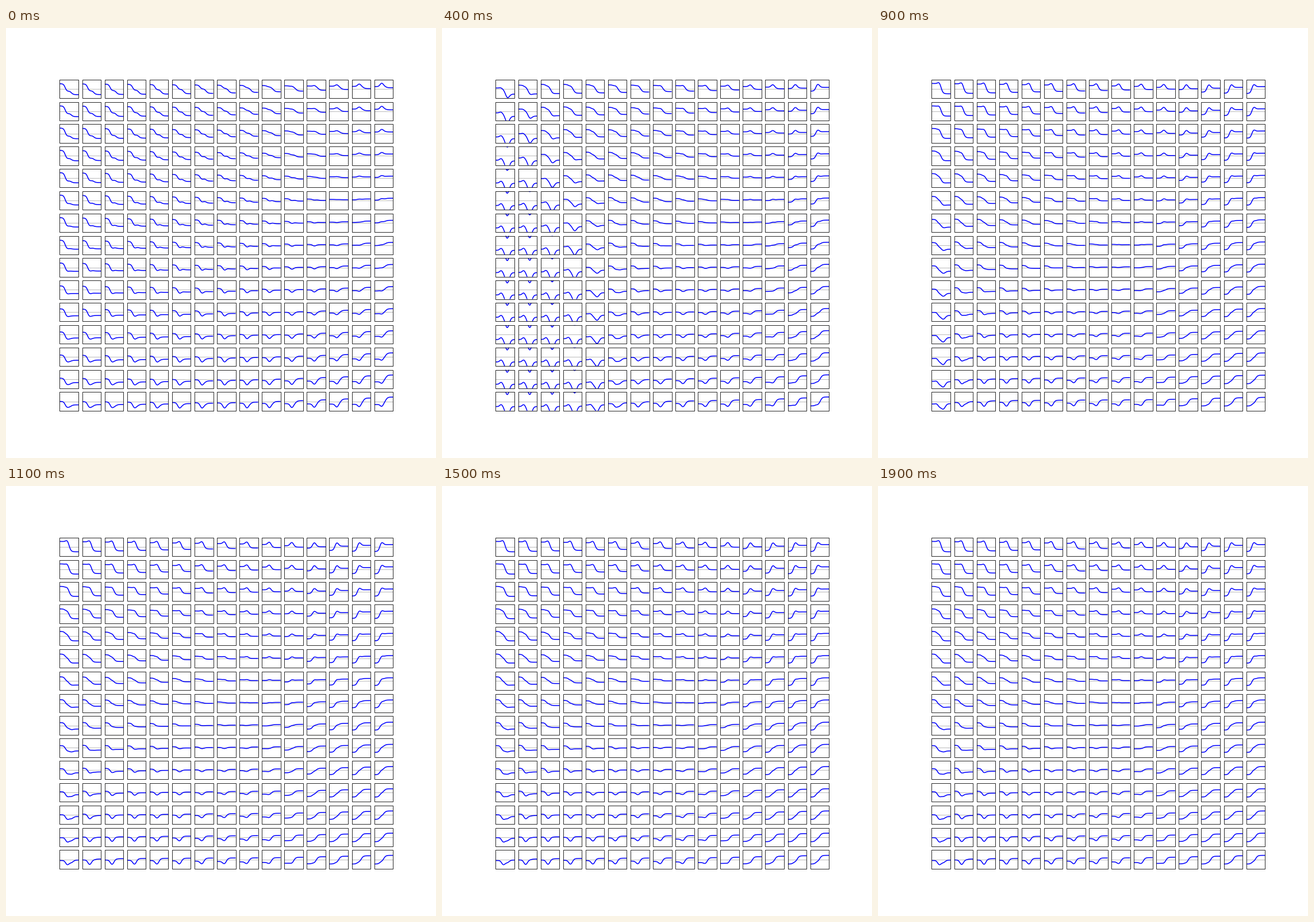
Write a matplotlib script that moves like this. It is 748 px wide and 748 px high and loops after 2000 ms.

```python
import numpy as np
import matplotlib.pyplot as plt
from matplotlib.animation import FuncAnimation
from matplotlib.collections import LineCollection
from matplotlib.patches import PathPatch
from matplotlib.path import Path

SIZE, N, FRAMES = 748, 15, 20
SPAN = N + 0.2 * (N - 1)
W, H = 0.775 * SIZE / SPAN, 0.77 * SIZE / SPAN
LEFT = 0.125 * SIZE + 1.2 * W * np.arange(N)
BASE = 0.88 * SIZE - H - 1.2 * H * np.arange(N)

x = np.linspace(0, W, 60)
col = np.arange(N)[None, :, None]
u = col / (N - 1)
v = np.arange(N)[:, None, None] / (N - 1)


def sigmoid(z):
    return 1 / (1 + np.exp(-z))


def bump(center, width):
    return np.exp(-((x - center) / width) ** 2 / 2)


def corners(tl, tr, bl, br):
    return (1 - v) * ((1 - u) * tl + u * tr) + v * ((1 - u) * bl + u * br)


def left_arch(power):
    return np.sin(np.pi * v) * (1 - u) ** power


top_arch = np.sin(np.pi * u)

# Each grid: starting level, first step, middle bump, second step.
FIRST = (corners(9, 4, 0, -5.5) + 4 * left_arch(1),
         corners(-12, 1, -10, 3) - 3 * left_arch(3),
         corners(-1, 5, -1, -6) - 2 * top_arch,
         corners(-7, -3, 4, 10) - 3 * top_arch)
LAST = (corners(9.5, 2, 0, -7) + 2 * left_arch(1),
        corners(-2, 0, -5, 0) - 5 * left_arch(3),
        corners(4.5, 5, -5, 0),
        corners(-16, 1, 6, 11))

# The shape that spreads from the bottom left corner and draws back.
PIT = -9 + 3.5 * bump(9.5, 2.5) - 18 * bump(20, 3.5)

TIMES = [0, 4, 6, 9, 11, 15, 19]
MIX = [0, 0.55, 0.75, 1, 1, 1, 1]
PIT_EDGE = [-6, 4.3, 2.7, 0, -0.8, -0.8, -0.8]
RISE_COL = [20, 12.5, 12, 10, 9.8, 9.6, 9.6]


def heights(frame):
    mix, edge, rise_col = (np.interp(frame, TIMES, k)
                           for k in (MIX, PIT_EDGE, RISE_COL))
    level, step1, peak, step2 = (a + mix * (b - a) for a, b in zip(FIRST, LAST))

    rise = sigmoid(1.6 * (col - rise_col - 1.2 * (1 - v)))
    level = level + rise * (-8 - level)
    step1 = step1 + rise * (11 - 7 * v)

    y = (level + step1 * sigmoid((x - 9.3) / 1.5) + peak * bump(13, 2.8)
         + step2 * sigmoid((x - 20 + 3.5 * mix) / 1.8))
    pit = sigmoid(1.6 * (edge - 4.5 * (1 - v) ** 2 - col))
    return y + pit * (PIT - y)


def curves(frame):
    y = heights(frame) + (BASE + H / 2)[:, None, None]
    xs = np.broadcast_to(LEFT[None, :, None] + x, y.shape)
    return np.stack([xs, y], axis=-1).reshape(N * N, len(x), 2)


fig = plt.figure(figsize=(SIZE / 100, SIZE / 100), dpi=100, facecolor="white")
ax = fig.add_axes([0, 0, 1, 1])
ax.set(xlim=(0, SIZE), ylim=(0, SIZE))
ax.axis("off")

cells = [(left, base) for base in BASE for left in LEFT]
boxes = Path.make_compound_path(*[
    Path([(a, b), (a + W, b), (a + W, b + H), (a, b + H), (a, b)], closed=True)
    for a, b in cells])
middles = Path.make_compound_path(*[
    Path([(a, b + H / 2), (a + W, b + H / 2)]) for a, b in cells])


def add_outline(path, color, zorder):
    ax.add_patch(PathPatch(path, fill=False, ec=color, lw=0.6, snap=True, zorder=zorder))


add_outline(middles, "#b0b0b0", 1)
add_outline(boxes, "black", 3)
lines = LineCollection(curves(0), colors="blue", linewidths=1.1, zorder=2)
ax.add_collection(lines, autolim=False)
lines.set_clip_path(boxes, ax.transData)


def update(frame):
    lines.set_segments(curves(frame))
    return [lines]


anim = FuncAnimation(fig, update, frames=FRAMES, interval=100,
                     repeat=True, repeat_delay=0, blit=False)
plt.show()
```
